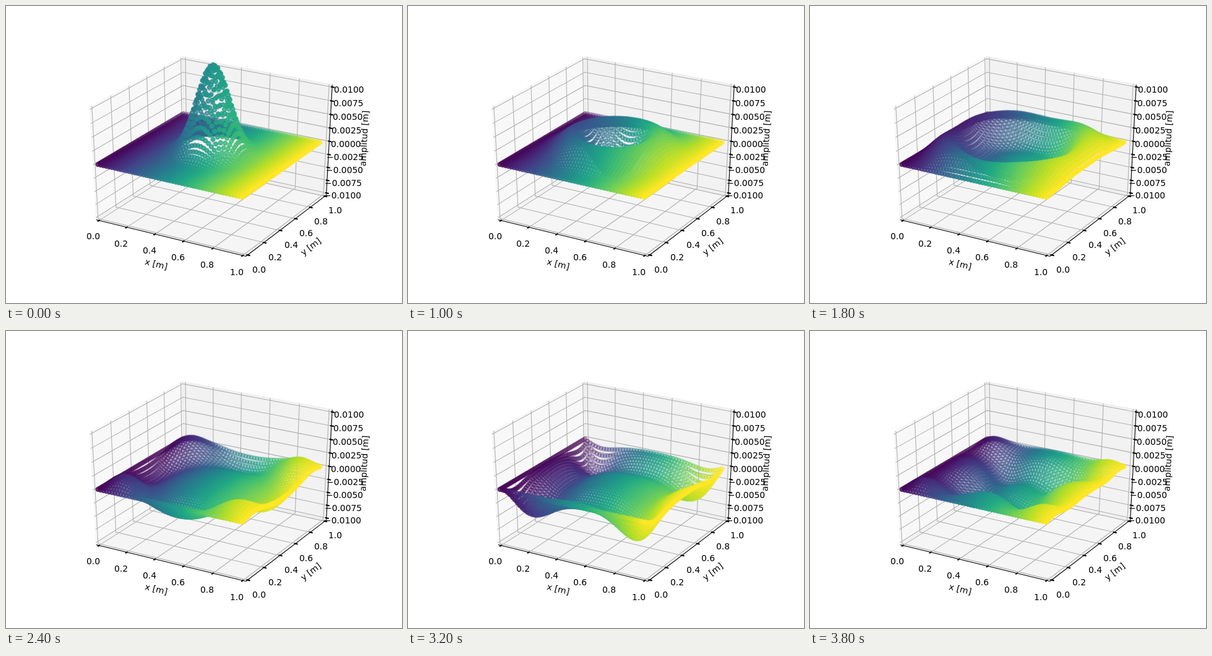
Recreate the animation shown at these times as an HTML page with a canvas. Size 640 by 480 pixels, loop 4000 ms.

```html
<!DOCTYPE html>
<html lang="es">
<head>
<meta charset="utf-8">
<title>Wave on a square membrane</title>
<style>
html, body { margin: 0; width: 100%; height: 100%; overflow: hidden; background: #fff; }
canvas { display: block; }
</style>
</head>
<body>
<canvas id="stage" width="640" height="480"></canvas>
<script>
const ctx = document.getElementById('stage').getContext('2d');

// Camera: azimuth -60 degrees, elevation 30 degrees, distance 10.
const DIST = 10, COS = Math.sqrt(3) / 2, SIN = 0.5;
const SCALE_X = 496 / 1.85, SCALE_Y = 369.6 / 1.85;
const CENTER_X = 334.7, CENTER_Y = 237.4;

// Takes unit cube coordinates centred on zero, gives [x, y, depth].
function project([x, y, z]) {
  const toward = x * SIN - y * COS;
  const p = DIST / (DIST - toward * COS - z * SIN);
  return [
    CENTER_X + (x * COS + y * SIN) * SCALE_X * p,
    CENTER_Y - (z * COS - toward * SIN) * SCALE_Y * p,
    -p
  ];
}

function trace(points) {
  ctx.beginPath();
  points.forEach(p => ctx.lineTo(...project(p).slice(0, 2)));
}

function line(points, color, width) {
  trace(points);
  ctx.strokeStyle = color;
  ctx.lineWidth = width;
  ctx.stroke();
}

const E = 0.5 + 1 / 48;              // pane edge
const TICK_IN = E - 0.1 / 12, TICK_OUT = E + 0.2 / 12;
const TEXT = E + 0.0738, TITLE = E + 0.1605;

const panes = [
  ['rgba(242,242,242,.5)', [[-E, -E, -E], [-E, E, -E], [-E, E, E], [-E, -E, E]]],
  ['rgba(230,230,230,.5)', [[-E, E, -E], [E, E, -E], [E, E, E], [-E, E, E]]],
  ['rgba(236,236,236,.5)', [[-E, -E, -E], [E, -E, -E], [E, E, -E], [-E, E, -E]]]
];

const tenths = v => (v + 0.5).toFixed(1);
const heights = v => (v * 0.02).toFixed(4).replace('-', '\u2212');

const axes = [
  { title: 'x [m]', steps: 5, format: tenths,
    at: (v, d) => [v, -d, -E], text: (v, d) => [v, -d, -d],
    grid: v => [[v, -E, -E], [v, E, -E], [v, E, E]] },
  { title: 'y [m]', steps: 5, format: tenths,
    at: (v, d) => [d, v, -E], text: (v, d) => [d, v, -d],
    grid: v => [[E, v, -E], [-E, v, -E], [-E, v, E]] },
  { title: 'amplitud [m]', steps: 8, format: heights,
    at: (v, d) => [d, E, v], text: (v, d) => [d, d, v],
    grid: v => [[-E, -E, v], [-E, E, v], [E, E, v]] }
];

// Upright labels start on whole pixels.
function drawLabel(label, point) {
  const [x, y] = project(point);
  const left = x - ctx.measureText(label).width / 2 + 0.9;
  ctx.fillStyle = '#000';
  ctx.fillText(label, Math.round(left), Math.round(y + 10.6) + 1);
}

function drawTitle(title, point, [ax, ay], [bx, by]) {
  const [x, y] = project(point);
  ctx.save();
  ctx.translate(x + 0.9, y + 1);
  ctx.rotate(Math.atan2(by - ay, bx - ax));
  ctx.fillStyle = '#000';
  ctx.fillText(title, -ctx.measureText(title).width / 2, 3.8);
  ctx.restore();
}

function drawAxis({ title, steps, format, at, text, grid }) {
  const ends = [at(-E, E), at(E, E)];
  line(ends, '#000', 1.11);
  drawTitle(title, text(0, TITLE), ...ends.map(project));

  const ticks = Array.from({ length: steps + 1 }, (_, i) => i / steps - 0.5);
  ticks.forEach(v => line(grid(v), '#b0b0b0', 1.11));
  ticks.forEach(v => {
    line([at(v, TICK_IN), at(v, TICK_OUT)], '#000', 2.08);
    drawLabel(format(v), text(v, TEXT));
  });
}

function drawBox() {
  ctx.fillStyle = '#fff';
  ctx.fillRect(0, 0, 640, 480);
  ctx.font = '13.89px "DejaVu Sans", sans-serif';
  for (const [color, corners] of panes) {
    trace(corners);
    ctx.closePath();
    ctx.fillStyle = ctx.strokeStyle = color;
    ctx.lineWidth = 1.39;
    ctx.fill();
    ctx.stroke();
  }
  axes.forEach(drawAxis);
}

const viridis = [
  [68, 1, 84], [72, 36, 117], [65, 68, 135], [53, 95, 141], [42, 120, 142], [33, 145, 140],
  [34, 168, 132], [68, 191, 112], [122, 209, 81], [189, 223, 38], [253, 231, 37]
];

function colorAt(v) {
  const i = Math.min(9, Math.floor(v * 10));
  return viridis[i].map((c, k) => Math.round(c + (viridis[i + 1][k] - c) * (v * 10 - i)));
}

// A Gaussian bump on a membrane with fixed edges, as a sum of sine modes.
// The sample grid stops one step before the far edges.
const N = 50, SIGMA = 0.1, PEAK = 0.0158 / 0.02, SPEED = 0.21;
const modes = [1, 3, 5, 7, 9, 11, 13, 15];
const weights = modes.map(m =>
  2 * SIGMA * Math.sqrt(2 * Math.PI) * Math.exp(-((m * Math.PI * SIGMA) ** 2) / 2) *
  Math.sin(m * Math.PI / 2));
const grid = Array.from({ length: N }, (_, i) => i / N);
const sines = grid.map(v => modes.map((m, k) => weights[k] * Math.sin(m * Math.PI * v)));
const colors = grid.map((_, i) => colorAt(i / (N - 1)));

const dot = (a, b) => a.reduce((sum, v, k) => sum + v * b[k], 0);

// Columns of constant x, from left to right, so that near ones cover far ones.
function surface(time) {
  const swing = modes.map(m => modes.map(n =>
    Math.cos(Math.PI * SPEED * time * Math.hypot(m, n))));
  return grid.flatMap((x, i) => {
    const column = swing.map(s => dot(s, sines[i]));
    return grid.map((y, j) => project([x - 0.5, y - 0.5, PEAK * dot(column, sines[j])]));
  });
}

function drawSurface(time) {
  const points = surface(time);
  const depths = points.map(p => p[2]);
  const near = Math.min(...depths), far = Math.max(...depths);
  ctx.lineWidth = 2.08;
  points.forEach(([x, y, depth], k) => {
    const alpha = 1 - 0.7 * (depth - near) / (far - near);
    ctx.fillStyle = ctx.strokeStyle = `rgba(${colors[Math.floor(k / N)]},${alpha})`;
    ctx.beginPath();
    ctx.arc(x, y, 3.1, 0, 2 * Math.PI);
    ctx.fill();
    ctx.stroke();
  });
}

const LOOP = 4000, STEP = 200;
const start = performance.now();
let shown = -1;

function tick() {
  const step = Math.floor((performance.now() - start) % LOOP / STEP);
  if (step !== shown) {
    shown = step;
    drawBox();
    drawSurface(step * STEP / 1000);
  }
  requestAnimationFrame(tick);
}
tick();
</script>
</body>
</html>
```
